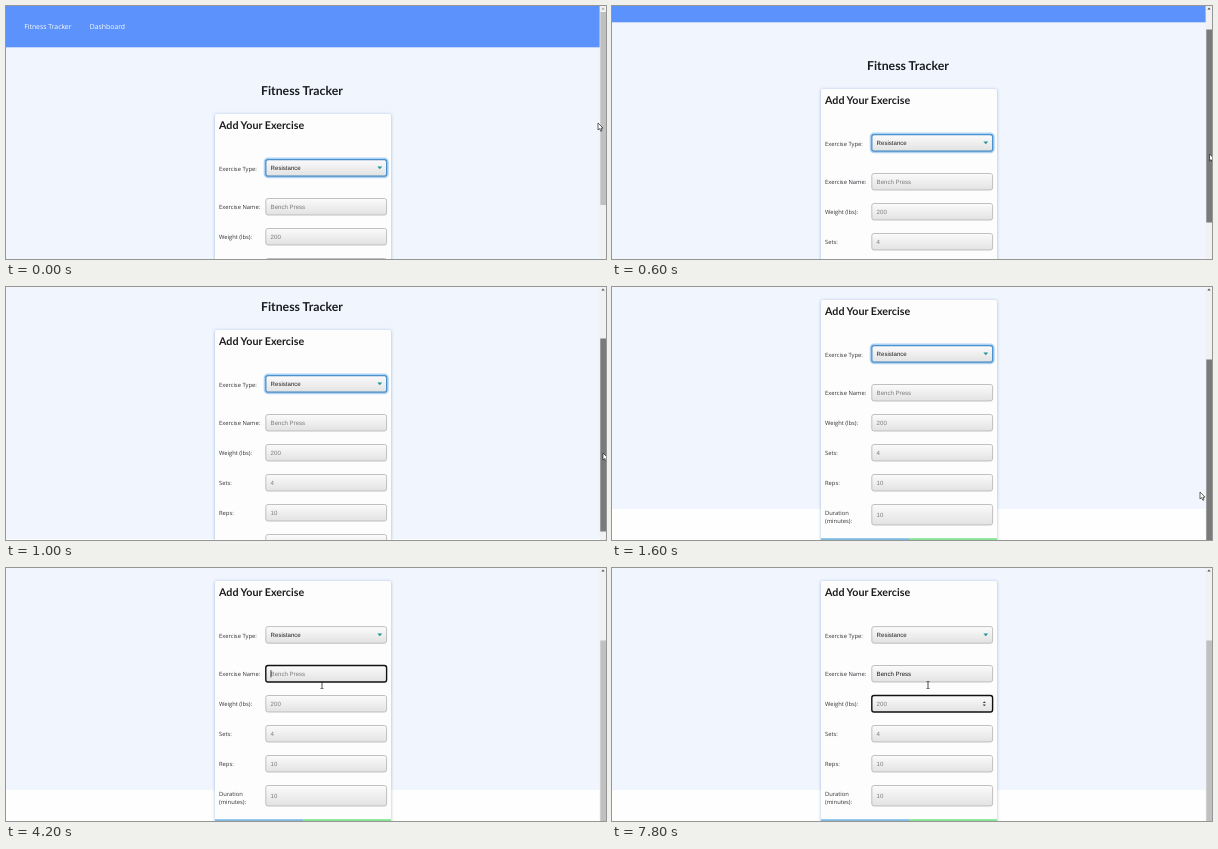
Write an HTML page with a canvas that moves like this. It is 600x253 px and loops after 8 s.

```html
<!DOCTYPE html>
<html lang="en">
<head>
<meta charset="utf-8">
<title>Fitness Tracker</title>
<style>
html, body { margin: 0; width: 100%; height: 100%; overflow: hidden; background: #f0f5fe; }
canvas { display: block; width: 600px; height: 253px; }
</style>
</head>
<body>
<canvas id="stage"></canvas>
<script>
const W = 600, H = 253, LOOP = 8000, STEP = 200;
const canvas = document.getElementById('stage');
const ctx = canvas.getContext('2d');
const ratio = window.devicePixelRatio || 1;
canvas.width = W * ratio;
canvas.height = H * ratio;

const TITLE = 'Lato, sans-serif';
const LABEL = '"Open Sans", sans-serif';
const FIELD = '"Liberation Sans", Arial, sans-serif';
const BOX = { x: 259.8, w: 120.8 };

// Moments of the interaction, in ms
const CLICK = 3200, TAB = 7200;

const scrollKeys = [[0, 0], [200, 3], [400, 11], [600, 25], [800, 45], [1000, 65], [1200, 95]];
const pointerKeys = [
  [0, 592, 117], [200, 595, 128], [400, 597, 136], [600, 597.5, 148],
  [1000, 597, 166], [1200, 595, 190], [1400, 592, 202], [1600, 588, 205],
  [1800, 492, 160], [2000, 360, 90], [2200, 236, 38], [2400, 229, 58],
  [2600, 236, 76], [2800, 262, 96], [3000, 298, 114], [CLICK, 316, 117]
];
const typing = [
  [4800, 'B'], [5200, 'Be'], [5600, 'Ben'], [5800, 'Bench'], [6000, 'Bench '],
  [6200, 'Bench P'], [6400, 'Bench Pr'], [6800, 'Bench Press']
];
const fields = [
  { label: ['Exercise Name:'], hint: 'Bench Press', y: 192.5, h: 16.5 },
  { label: ['Weight (lbs):'], hint: '200', y: 222.5, h: 16.5 },
  { label: ['Sets:'], hint: '4', y: 252.5, h: 16.5 },
  { label: ['Reps:'], hint: '10', y: 282.5, h: 16.5 },
  { label: ['Duration', '(minutes):'], hint: '10', y: 312.5, h: 20.5 }
];

// Linear interpolation between keys of the form [time, value, ...]
function tween(keys, t, i = 1) {
  const next = keys.findIndex(k => k[0] > t);
  if (next < 0) return keys[keys.length - 1][i];
  const a = keys[next - 1], b = keys[next];
  return a[i] + (b[i] - a[i]) * (t - a[0]) / (b[0] - a[0]);
}

function rect(x, y, w, h, color) {
  ctx.fillStyle = color;
  ctx.fillRect(x, y, w, h);
}

function rounded(x, y, w, h, r) {
  ctx.beginPath();
  ctx.roundRect(x, y, w, h, r);
}

function text(str, x, y, size, family, color, weight = 400) {
  ctx.font = `${weight} ${size}px ${family}`;
  ctx.fillStyle = color;
  ctx.fillText(str, x, y);
}

function shape(points, fill) {
  ctx.beginPath();
  points.forEach(([x, y]) => ctx.lineTo(x, y));
  ctx.closePath();
  ctx.fillStyle = fill;
  ctx.fill();
}

function triangle(x, y, half, height, color) {
  shape([[x - half, y], [x + half, y], [x, y + height]], color);
}

function control(y, h, focused) {
  const fill = ctx.createLinearGradient(0, y, 0, y + h);
  fill.addColorStop(0, '#fbfbfb');
  fill.addColorStop(1, '#e2e2e2');
  rounded(BOX.x, y, BOX.w, h, 2.2);
  ctx.fillStyle = fill;
  ctx.fill();
  ctx.strokeStyle = focused ? '#111' : '#b2b2b2';
  ctx.lineWidth = focused ? 1.4 : 0.8;
  ctx.stroke();
}

function drawSelect(focused) {
  const y = 153.6, h = 16.6;
  if (focused) {
    rounded(BOX.x - 0.6, y - 0.6, BOX.w + 1.2, h + 1.2, 3);
    ctx.strokeStyle = 'rgba(110,175,235,.55)';
    ctx.lineWidth = 3;
    ctx.stroke();
  }
  control(y, h, false);
  if (focused) {
    ctx.strokeStyle = '#4b93cf';
    ctx.lineWidth = 1.2;
    ctx.stroke();
  }
  text('Resistance', 264.6, 164.1, 6.1, FIELD, '#222');
  triangle(373.8, 160.6, 2.4, 2.6, '#1c969c');
}

function drawCaret(x, y) {
  rect(x, y - 3.7, 0.7, 7.4, '#111');
}

function drawFields(t) {
  const typed = typing.filter(k => k[0] <= t).pop();
  const name = typed ? typed[1] : '';
  const active = t >= TAB ? 1 : t >= CLICK ? 0 : -1;
  const lastInput = t >= TAB ? TAB : typed ? t : CLICK;
  const caretOn = (t - lastInput) % 1000 < 500;

  fields.forEach((f, i) => {
    const mid = f.y + f.h / 2;
    const value = i === 0 ? name : '';
    f.label.forEach((line, n) => {
      const y = mid + 2.6 + (f.label.length > 1 ? n * 8 - 4 + 1.4 : 0);
      text(line, 213, y, 5.8, LABEL, '#303236');
    });
    control(f.y, f.h, i === active);
    text(value || f.hint, 264.6, mid + 2.2, 6.1, FIELD, value ? '#1a1a1a' : '#7c7c7c');
    if (i === active && caretOn) drawCaret(264.6 + ctx.measureText(value).width, mid);
    if (i === 1 && active === 1) {
      triangle(372.3, mid - 0.7, 1.6, -1.9, '#444');
      triangle(372.3, mid + 0.7, 1.6, 1.9, '#444');
    }
  });
}

function drawCard(t) {
  ctx.save();
  ctx.shadowColor = 'rgba(70,115,165,.5)';
  ctx.shadowBlur = 3 * ratio;
  ctx.shadowOffsetY = 0.4 * ratio;
  rounded(209, 108, 176, 258, 2);
  ctx.fillStyle = '#fefdfe';
  ctx.fill();
  ctx.restore();
  text('Add Your Exercise', 213, 122.6, 10.7, TITLE, '#1c1c1f', 700);
  text('Exercise Type:', 213, 164.5, 5.8, LABEL, '#303236');
  drawSelect(t < CLICK);
  drawFields(t);
  rect(209, 346.2, 88, 18, '#7fbbe2');
  rect(297, 346.2, 88, 18, '#82e391');
}

function drawPage(t, scroll) {
  rect(0, 0, W, H, '#fefefe');
  ctx.save();
  ctx.translate(0, -scroll);
  rect(0, 0, W, 317, '#f0f5fe');
  rect(0, 0, W, 41.3, '#5b92fb');
  text('Fitness Tracker', 18.2, 22.7, 6.85, LABEL, '#fff');
  text('Dashboard', 83.8, 22.7, 6.85, LABEL, '#fff');
  text('Fitness Tracker', 255, 89.2, 12.3, TITLE, '#1c1c1f', 700);
  drawCard(t);
  ctx.restore();
}

function drawScrollbar(t, scroll) {
  const dragging = t >= 200 && t <= 1600;
  rect(593.6, 0, 6.4, H, '#f1f1f1');
  rect(594.3, 6 + scroll * 0.7, 5.7, 193, dragging ? '#7a7a7a' : '#c0c0c0');
  triangle(597, 3.4, 1.7, -2, scroll > 0 ? '#505050' : '#a3a3a3');
}

function drawArrow(x, y) {
  ctx.save();
  ctx.translate(x, y);
  shape([[0, 0], [0, 7], [1.6, 5.6], [2.8, 8.2], [4, 7.7], [2.9, 5.2], [5, 5.1]], '#fff');
  ctx.strokeStyle = '#222';
  ctx.lineWidth = 0.7;
  ctx.stroke();
  ctx.restore();
}

function drawBeam(x, y) {
  rect(x - 0.4, y - 3.4, 0.8, 6.8, '#222');
  rect(x - 1.6, y - 3.7, 3.2, 0.7, '#444');
  rect(x - 1.6, y + 3, 3.2, 0.7, '#444');
}

function draw(t) {
  const scroll = tween(scrollKeys, t);
  ctx.setTransform(ratio, 0, 0, ratio, 0, 0);
  ctx.textRendering = 'geometricPrecision';
  drawPage(t, scroll);
  drawScrollbar(t, scroll);
  const pointer = t >= 3000 ? drawBeam : drawArrow;
  pointer(tween(pointerKeys, t, 1), tween(pointerKeys, t, 2));
}

const start = performance.now();
function tick() {
  const t = (performance.now() - start) % LOOP;
  draw(Math.floor(t / STEP) * STEP);
  requestAnimationFrame(tick);
}
tick();
</script>
</body>
</html>
```
